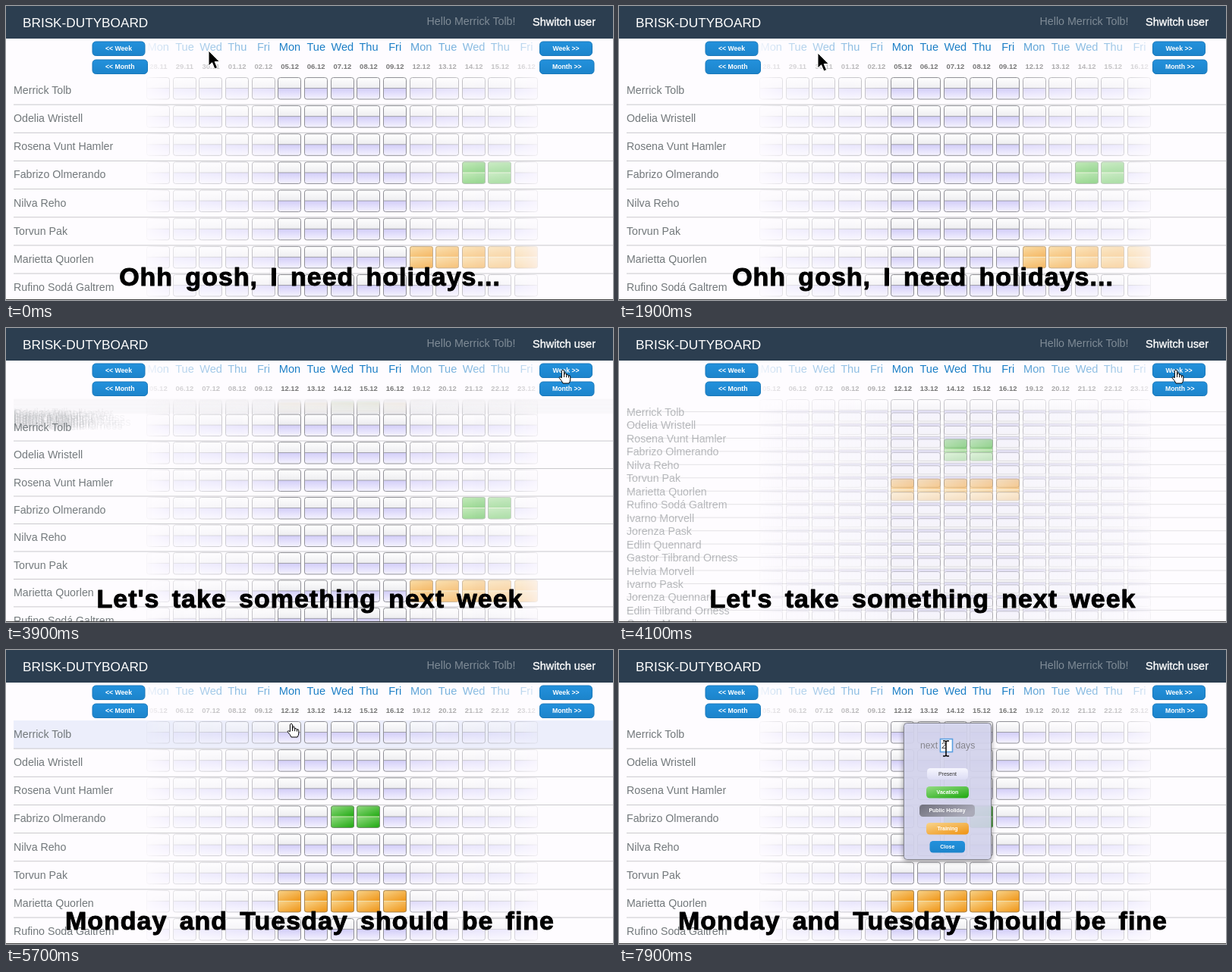
Write an HTML page that moves like this. It is 800x388 px and loops after 8000 ms.

```html
<!DOCTYPE html>
<html lang="en">
<head>
<meta charset="utf-8">
<title>Timesheet walkthrough</title>
<style>
  html, body { margin: 0; width: 100%; height: 100%; overflow: hidden; background: #fff; }
  svg { display: block; width: 100vw; height: 100vh; font-family: "Liberation Sans", Arial, sans-serif; }
  .name { font-size: 14.2px; fill: #72787b; }
  .day { font-size: 14.6px; fill: #1c7fc6; text-anchor: middle; }
  .date { font-size: 9.5px; font-weight: bold; fill: #777; text-anchor: middle; }
  .btn { font-size: 8.7px; font-weight: bold; fill: #fff; text-anchor: middle; }
  .small { font-size: 7px; font-weight: bold; fill: #fff; text-anchor: middle; }
  .label { font-size: 12.2px; fill: #85858c; }
  .caption { font-size: 34px; font-weight: bold; letter-spacing: 1px; word-spacing: 5.8px;
    text-anchor: middle; stroke: #000; stroke-width: 1px; stroke-linejoin: round; }
</style>
</head>
<body>
<svg id="stage" viewBox="0 0 800 388">
  <defs>
    <linearGradient id="fade" gradientUnits="userSpaceOnUse" x1="184" x2="703" y1="0" y2="0">
      <stop offset="0" stop-color="#fff" stop-opacity=".05"/>
      <stop offset=".06" stop-color="#fff" stop-opacity=".25"/>
      <stop offset=".333" stop-color="#fff" stop-opacity=".62"/>
      <stop offset=".333" stop-color="#fff"/>
      <stop offset=".667" stop-color="#fff"/>
      <stop offset=".667" stop-color="#fff" stop-opacity=".75"/>
      <stop offset=".94" stop-color="#fff" stop-opacity=".35"/>
      <stop offset="1" stop-color="#fff" stop-opacity=".12"/>
    </linearGradient>
    <mask id="sides" maskUnits="userSpaceOnUse" x="0" y="0" width="800" height="388">
      <rect width="800" height="388" fill="url(#fade)"/>
    </mask>
    <clipPath id="body"><rect y="93" width="800" height="295"/></clipPath>
    <filter id="shadow" x="-20%" y="-20%" width="140%" height="140%">
      <feDropShadow dx="0" dy="1" stdDeviation="3" flood-opacity=".45"/>
    </filter>
  </defs>
  <rect width="800" height="388" fill="#fefcff"/>
  <rect id="hover" x="10" y="93" width="790" height="37" fill="#eceefb"/>
  <g clip-path="url(#body)">
    <g id="labels"></g>
    <g mask="url(#sides)"><g id="cells"></g></g>
  </g>
  <g id="dates" mask="url(#sides)"></g>
  <g id="buttons" stroke="#1a78ba"></g>
  <rect width="800" height="43" fill="#2c3e50"/>
  <text x="22" y="28" font-size="17.2" fill="#fff">BRISK-DUTYBOARD</text>
  <text x="671.5" y="25" font-size="14.25" fill="#7f8b96" text-anchor="end">Hello Merrick Tolb!</text>
  <text x="694" y="26" font-size="14.5" fill="#fff" stroke="#fff" stroke-width=".35">Shwitch user</text>
  <g id="popup">
    <rect x="375.5" y="96.5" width="115" height="180" rx="4" fill="#d7d8f1" fill-opacity=".88" stroke="#85858f" filter="url(#shadow)"/>
    <text class="label" x="397" y="130">next</text>
    <text class="label" x="443.5" y="130">days</text>
    <rect id="field" x="423.5" y="117.5" width="16" height="17" fill="#fff"/>
    <text id="typed" x="425" y="130" font-size="11.5" fill="#444">2</text>
  </g>
  <rect y="387" width="800" height="1" fill="#444"/>
  <text id="caption" class="caption" x="400.5" y="369"></text>
  <g id="pointer">
    <path id="arrow" d="M0 0V20L4.6 15.8L8 24L11.6 22.4L8.2 14.6H14.4Z" fill="#000" stroke="#fff"/>
    <path id="hand" d="M-1.6 1.4Q0-1 1.6 1.4V7Q3-.0 4.6 7Q6.4 5.4 7.4 8Q9.6 6.8 9.8 9.6V13Q9.6 15.5 8 18H0Q-1.4 14.6-4.6 11.4Q-5.6 8.6-1.6 10.6ZM1.6 7V10M4.6 7.2V10.2M7.4 8V10.6" fill="#fff" stroke="#000" stroke-linejoin="round"/>
    <path id="beam" d="M-4-10H-1.2L0-9L1.2-10H4M0-9V9M-4 10H-1.2L0 9L1.2 10H4" fill="none" stroke="#000" stroke-width="1.5"/>
  </g>
</svg>
<script>
const LOOP = 8000, COLS = 15, PITCH = 37.15, TOP = 93, ROWS = 29;
const SWAP = { start: 3861, length: 500 };
const POPUP_AT = 6100, FOCUS_AT = 7300, TYPED_AT = 7600;

const team = ['Merrick Tolb', 'Odelia Wristell', 'Rosena Vunt Hamler', 'Fabrizo Olmerando',
  'Nilva Reho', 'Torvun Pak', 'Marietta Quorlen', 'Rufino Sodá Galtrem'];
const firsts = ['Edlin', 'Gastor', 'Helvia', 'Ivarno', 'Jorenza'];
const lasts = ['Morvell', 'Pask', 'Quennard', 'Tilbrand Orness'];
while (team.length < ROWS) {
  const i = team.length;
  team.push(`${firsts[i % 5]} ${lasts[i % 4]}`);
}

const $ = id => document.getElementById(id);

function add(parent, tag, attrs, text) {
  const el = document.createElementNS('http://www.w3.org/2000/svg', tag);
  for (const key in attrs) el.setAttribute(key, attrs[key]);
  if (text) el.textContent = text;
  parent.append(el);
  return el;
}

function show(el, visible) {
  el.setAttribute('display', visible ? 'inline' : 'none');
}

const defs = document.querySelector('defs');

function gradient(id, from, to, x2 = 0, y2 = 1) {
  const g = add(defs, 'linearGradient', { id, x1: 0, y1: 0, x2, y2 });
  add(g, 'stop', { offset: 0, 'stop-color': from });
  add(g, 'stop', { offset: 1, 'stop-color': to });
  return `url(#${id})`;
}

const blue = gradient('blue', '#2391dc', '#1c84cb');
const green = gradient('green', '#95dc84', '#27ac18', 0.8, 1);
const orange = gradient('orange', '#f8d48c', '#f0981c', 0.8, 1);
const grey = gradient('grey', '#70707c', '#aaaab8', 1, 0.4);
const pale = gradient('pale', '#f6f6fe', '#dcdcf4');

// Cell styles: upper half, lower half, border
const styles = {
  present: [gradient('upper', '#ffffff', '#ececef'), gradient('lower', '#d2cdf8', '#f5f3ff'), '#909096'],
  vacation: [green, green, '#6d8a68'],
  training: [orange, orange, '#a58452']
};
for (const [kind, [upper, lower, border]] of Object.entries(styles)) {
  const g = add(defs, 'g', { id: kind });
  add(g, 'rect', { width: 31, height: 15, rx: 3, fill: upper });
  add(g, 'rect', { y: 14.5, width: 31, height: 14.5, rx: 3, fill: lower });
  add(g, 'path', { d: 'M0 14.5H31', stroke: kind === 'present' ? '#8f8f98' : '#f0f0d0', 'stroke-opacity': 0.8 });
  add(g, 'rect', { x: 0.5, y: 0.5, width: 30, height: 28.5, rx: 3, fill: 'none', stroke: border });
}

function kindOf(row, day) {
  if (row === 3 && (day === 12 || day === 13)) return 'vacation';
  if (row === 6 && day >= 10 && day < 15) return 'training';
  return 'present';
}

const colX = col => 185 + 34.65 * col;

function makeRow(row, week) {
  const line = add($('labels'), 'path', { d: 'M10 0H800', stroke: '#c9c9cc' });
  const label = add($('labels'), 'text', { class: 'name', x: 10, y: 23 }, team[row]);
  const cells = add($('cells'), 'g', {});
  for (let col = 0; col < COLS; col++) {
    add(cells, 'use', { href: '#' + kindOf(row, col + week * 5), x: Math.round(colX(col)), y: 1 });
  }
  return { line, label, cells };
}

// The outgoing rows lie above the incoming ones
const after = team.map((_, row) => makeRow(row, 1));
const before = Array.from({ length: 9 }, (_, row) => makeRow(row, 0));

const dateTexts = [];
for (let col = 0; col < COLS; col++) {
  const x = colX(col) + 15.8;
  add($('dates'), 'text', { class: 'day', x, y: 59 }, ['Mon', 'Tue', 'Wed', 'Thu', 'Fri'][col % 5]);
  dateTexts.push(add($('dates'), 'text', { class: 'date', x, y: 83 }));
}

function dateLabel(col, week) {
  const d = new Date(2016, 10, 28 + 7 * (week + Math.floor(col / 5)) + col % 5);
  return [d.getDate(), d.getMonth() + 1].map(n => String(n).padStart(2, '0')).join('.');
}

function button(parent, x, y, width, height, fill, text, cls, style = '') {
  add(parent, 'rect', { x, y, width, height, rx: 4.5, fill });
  add(parent, 'text', { class: cls, x: x + width / 2, y: y + height / 2 + (cls === 'btn' ? 3 : 2.4), stroke: 'none', style }, text);
}

button($('buttons'), 114, 47, 69, 18.5, blue, '<< Week', 'btn');
button($('buttons'), 114, 71, 72.5, 18.5, blue, '<< Month', 'btn');
button($('buttons'), 703.5, 47, 69, 18.5, blue, 'Week >>', 'btn');
button($('buttons'), 703.5, 71, 71.5, 18.5, blue, 'Month >>', 'btn');

button($('popup'), 406, 156, 54, 15, pale, 'Present', 'small', 'fill: #333; font-weight: normal');
button($('popup'), 405, 180, 56, 15.5, green, 'Vacation', 'small');
button($('popup'), 396, 204, 73, 16, grey, 'Public Holiday', 'small');
button($('popup'), 405, 228, 56, 15.5, orange, 'Training', 'small');
button($('popup'), 409.5, 252, 46.5, 15.5, blue, 'Close', 'small');

const captions = [
  [0, 2500, 'Ohh gosh, I need holidays...'],
  [2600, 4500, "Let's take something next week"],
  [5200, LOOP, 'Monday and Tuesday should be fine']
];

// time, x, y
const path = [[0, 267, 59], [1900, 262, 62], [2600, 262, 62], [3500, 734, 55], [4150, 734, 55],
  [4700, 438, 54], [5500, 376, 97], [6300, 376, 97], [7000, 425, 121], [7300, 431, 130], [LOOP, 431, 130]];
const pointers = [[0, 'arrow'], [3420, 'hand'], [4220, 'arrow'], [4500, 'beam'], [4900, 'arrow'],
  [5450, 'hand'], [POPUP_AT, 'arrow'], [6850, 'beam']];

const smooth = u => u * u * (3 - 2 * u);

function pointerAt(t) {
  const i = path.findIndex(p => p[0] > t);
  const [t0, x0, y0] = path[i - 1], [t1, x1, y1] = path[i];
  const k = smooth((t - t0) / (t1 - t0));
  return [x0 + (x1 - x0) * k, y0 + (y1 - y0) * k];
}

function place({ line, label, cells }, y, height, opacity) {
  const put = (el, at) => {
    show(el, opacity > 0 && at < 388);
    el.setAttribute('transform', `translate(0 ${at.toFixed(2)})`);
    el.setAttribute('opacity', opacity.toFixed(3));
  };
  put(line, y + height);
  put(label, y);
  put(cells, y);
}

function render(t) {
  // Incoming rows unfold from zero height while the outgoing ones below collapse
  const p = smooth(Math.min(1, Math.max(0, (t - SWAP.start) / SWAP.length)));
  const grown = PITCH * p, left = PITCH - grown;
  before.forEach((row, i) => place(row, TOP + ROWS * grown + i * left, left, 1 - p));
  after.forEach((row, i) => place(row, TOP + i * grown, grown, p && 0.05 + 0.95 * p));
  dateTexts.forEach((el, col) => { el.textContent = dateLabel(col, p > 0 ? 1 : 0); });

  const [x, y] = pointerAt(t);
  const open = t >= POPUP_AT;
  $('pointer').setAttribute('transform', `translate(${x.toFixed(1)} ${y.toFixed(1)})`);
  const shape = pointers.filter(([from]) => t >= from).pop()[1];
  for (const id of ['arrow', 'hand', 'beam']) show($(id), id === shape);

  show($('hover'), !open && y > TOP);
  show($('popup'), open);
  show($('typed'), t >= TYPED_AT);
  $('field').setAttribute('stroke', t >= FOCUS_AT ? '#5a9fe0' : '#a9a9b2');
  $('field').setAttribute('stroke-width', t >= FOCUS_AT ? 1.6 : 1);

  const line = captions.find(([from, to]) => t >= from && t < to);
  $('caption').textContent = line ? line[2] : '';
}

const started = performance.now();
function tick() {
  render((performance.now() - started) % LOOP);
  requestAnimationFrame(tick);
}
tick();
</script>
</body>
</html>
```
